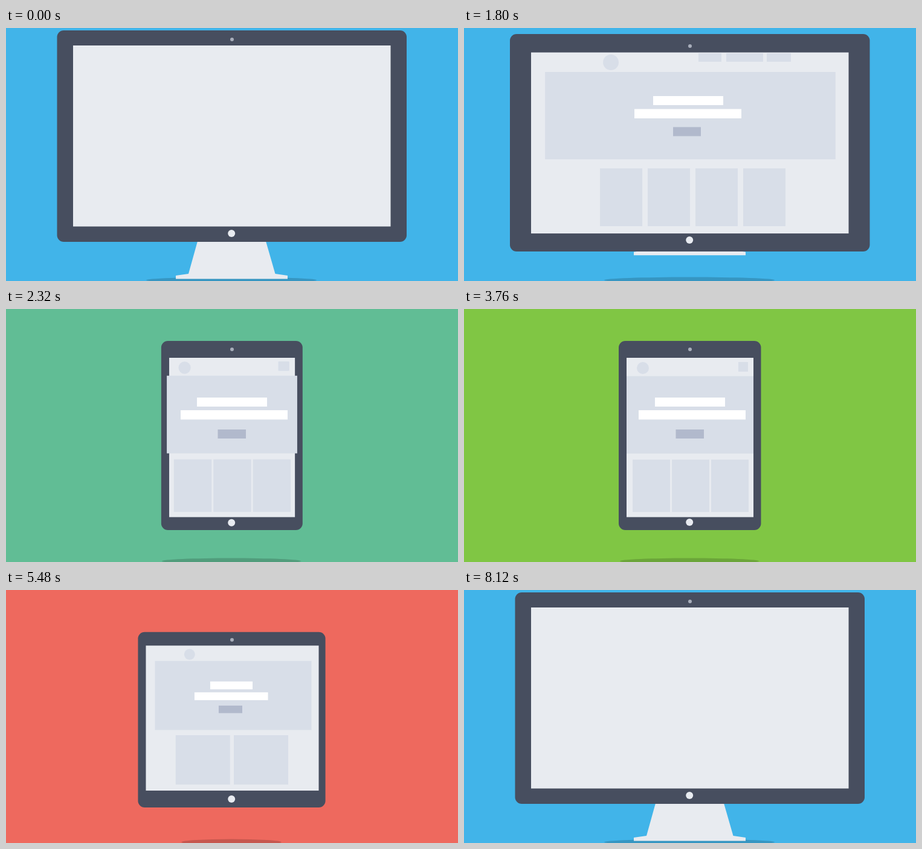
Animation, 748 px wide and 420 px high, one loop 8660 ms. Source, as an HTML page:

```html
<!DOCTYPE html>
<html lang="en">
<head>
<meta charset="utf-8">
<title>Responsive layout</title>
<style>
  html, body { margin: 0; width: 100%; height: 100%; overflow: hidden; background: #41b4e9; }
  svg { display: block; width: 748px; height: 420px; }
</style>
</head>
<body>
<svg id="stage" viewBox="0 0 748 420"></svg>
<script>
const LOOP = 8660;
const stage = document.getElementById('stage');

const BLOCK = '#d8dee8', PALE = '#e8ebf0', DARK = '#474e5f';

// Parts in paint order: fill, corner radius, entrance delay in ms
const STYLE = {
  shadow: ['rgba(0,0,0,.17)', 999],
  stand: [PALE, 0],
  body: [DARK, 11],
  screen: [PALE, 0],
  cam: ['#a8aebb', 999],
  home: [PALE, 999],
  logo: [BLOCK, 999, 60],
  nav0: [BLOCK, 0, 120],
  nav1: [BLOCK, 0, 180],
  nav2: [BLOCK, 0, 240],
  card0: [BLOCK, 0, 200],
  card1: [BLOCK, 0, 260],
  card2: [BLOCK, 0, 320],
  card3: [BLOCK, 0, 380],
  hero: [BLOCK, 0, 0],
  title: ['#fff', 0, 120],
  line: ['#fff', 0, 180],
  button: ['#b1b9cc', 0, 240]
};

// Expands a short layout description into one [x, y, w, h] per part
function layout({ cam, home, shadow, stand, nav, cards, ...rects }) {
  const [x, step, w, y, h, count] = cards;
  const pose = {
    ...rects,
    cam: [371, cam - 3, 6, 6],
    home: [367.2, home - 6, 12, 12],
    shadow: [373 - shadow / 2, 413.5, shadow, 10],
    stand: [stand]
  };
  nav.forEach((r, i) => pose['nav' + i] = r);
  for (let i = 0; i < 4; i++) {
    pose['card' + i] = i < count
      ? [x + i * step, y, w, h]
      : [x + (count - 1) * step + w, y, 0, h];
  }
  return pose;
}

const same = r => [r, r, r];

const monitor = layout({
  body: [84.5, 4, 578.5, 351], screen: [111, 29, 525.5, 300.5],
  hero: [111, 69, 525.5, 149],
  title: [313, 113, 116, 15], line: [282, 134.5, 177, 15.5], button: [346, 164.5, 46, 15],
  logo: [219, 37, 26, 26],
  nav: [[388, 41, 39, 15], [435, 41, 61, 15], [503, 41, 39, 15]],
  cards: [221, 80.5, 70, 232, 97.5, 4],
  cam: 19, home: 341, shadow: 282, stand: 0
});

const swollen = layout({
  body: [76, 10, 595.5, 361], screen: [111, 40.5, 525.5, 300.5],
  hero: [134, 73, 481, 145],
  title: monitor.title, line: monitor.line, button: monitor.button,
  logo: [230, 44, 26, 26],
  nav: [[388, 42, 38, 14], [434, 42, 61, 14], [501, 42, 40, 14]],
  cards: [225, 79, 70, 233, 96, 4],
  cam: 30, home: 352, shadow: 282, stand: -39
});

const squeezed = layout({
  body: [258.5, 53, 231, 314], screen: [272, 81, 204.5, 264.5],
  hero: [254, 107.5, 240, 130.5],
  title: [316, 147, 116, 15], line: [289, 168, 177, 15.5], button: [350.5, 200, 46.5, 15],
  logo: [283, 84, 21, 22],
  nav: same([444, 83, 20, 14]),
  cards: [273, 67, 64, 248, 88, 3],
  cam: 67, home: 356.5, shadow: 230, stand: -80
});

const tablet = layout({
  body: [256, 53, 235.5, 314], screen: [269, 81, 210, 264.5],
  hero: [269, 111.5, 210, 128.5],
  title: squeezed.title, line: squeezed.line, button: squeezed.button,
  logo: [286, 88, 20, 20],
  nav: same([454, 88.5, 16, 15.5]),
  cards: [279, 65, 62, 250, 87, 3],
  cam: 67, home: 354, shadow: 230, stand: -80
});

const phone = layout({
  body: [308, 100, 132, 256], screen: [318, 122, 112, 207],
  hero: [318, 145, 112, 93],
  title: [345, 173, 57, 11], line: [322, 188, 104, 11], button: [357, 206, 34, 11],
  logo: [327, 126, 15, 15],
  nav: same([410, 128, 12, 11]),
  cards: [326, 51, 45, 246, 74, 2],
  cam: 112, home: 343, shadow: 128, stand: -80
});

const widening = layout({
  body: [219, 70, 309, 291], screen: [232, 92.5, 285, 240.5],
  hero: [247, 118, 258, 114.5],
  title: [338, 152, 70, 13], line: [312, 170, 121.5, 13], button: [352, 192, 39, 12.5],
  logo: [295, 98, 18, 18],
  nav: same([485, 107, 0, 0]),
  cards: [281, 96, 90, 241, 82, 2],
  cam: 83, home: 347, shadow: 165, stand: -80
});

// Pose beyond or between two others
function blend(a, b, k) {
  const out = {};
  for (const part in a) out[part] = a[part].map((v, i) => v + (b[part][i] - v) * k);
  return out;
}

const POSES = [
  [0, monitor], [1600, monitor], [1800, swollen], [2200, squeezed], [2400, tablet],
  [3760, tablet], [3880, blend(tablet, phone, -.05)], [4240, blend(tablet, phone, 1.05)],
  [4440, phone], [5320, phone], [5480, widening], [5720, swollen],
  [6000, monitor], [LOOP, monitor]
];

const BLUE = [65, 180, 233], GREEN = [128, 198, 68], RED = [238, 105, 94];
const SKY = [
  [0, BLUE], [2240, BLUE], [2400, GREEN], [4280, GREEN], [4440, RED],
  [5840, RED], [6000, BLUE], [LOOP, BLUE]
];

const tracks = {};
for (const part in STYLE) tracks[part] = POSES.map(([t, pose]) => [t, pose[part]]);

// Monotone cubic through the keys: smooth passage, no stray overshoot
function sample(keys, t) {
  let i = 0;
  while (i < keys.length - 2 && t >= keys[i + 1][0]) i++;
  const span = keys[i + 1][0] - keys[i][0];
  const u = (t - keys[i][0]) / span;
  return keys[i][1].map((a, c) => {
    const slope = j => keys[j] && keys[j + 1]
      ? (keys[j + 1][1][c] - keys[j][1][c]) / (keys[j + 1][0] - keys[j][0]) : 0;
    const tangent = j => {
      const p = slope(j - 1), q = slope(j);
      return p * q > 0 ? 2 * p * q / (p + q) : 0;
    };
    const b = keys[i + 1][1][c];
    return a + (b - a) * u * u * (3 - 2 * u)
      + span * u * (1 - u) * (tangent(i) * (1 - u) - tangent(i + 1) * u);
  });
}

const clamp = v => Math.min(1, Math.max(0, v));

// Size factor of page content as it grows in and shrinks away
function presence(delay, t) {
  const grow = clamp((t - 240 - delay) / 300);
  const shrink = clamp((t - 7360 - (420 - delay)) / 300);
  return (1 - (1 - grow) ** 3) * (1 - shrink ** 3);
}

function add(tag, attrs) {
  const el = document.createElementNS('http://www.w3.org/2000/svg', tag);
  for (const name in attrs) el.setAttribute(name, attrs[name]);
  return stage.appendChild(el);
}

const sky = add('rect', { width: 748, height: 420 });
const shapes = {};
for (const part in STYLE) {
  const [fill, rx] = STYLE[part];
  shapes[part] = part === 'stand'
    ? add('path', { fill, d: 'M317 354H430L445.5 408L466 411V416.5H281V411L302 408Z' })
    : add('rect', { fill, rx });
}

function draw(t) {
  sky.setAttribute('fill', `rgb(${sample(SKY, t).map(Math.round)})`);
  for (const part in STYLE) {
    const el = shapes[part];
    const [x, y, w, h] = sample(tracks[part], t);
    if (part === 'stand') {
      el.setAttribute('transform', `translate(0 ${x})`);
      el.setAttribute('visibility', x < -48 ? 'hidden' : 'visible');
      continue;
    }
    const delay = STYLE[part][2];
    const k = delay === undefined ? 1 : presence(delay, t);
    el.setAttribute('x', x + w * (1 - k) / 2);
    el.setAttribute('y', y + h * (1 - k) / 2);
    el.setAttribute('width', Math.max(0, w * k));
    el.setAttribute('height', Math.max(0, h * k));
  }
}

const start = performance.now();
function tick() {
  draw((performance.now() - start) % LOOP);
  requestAnimationFrame(tick);
}
tick();
</script>
</body>
</html>
```
